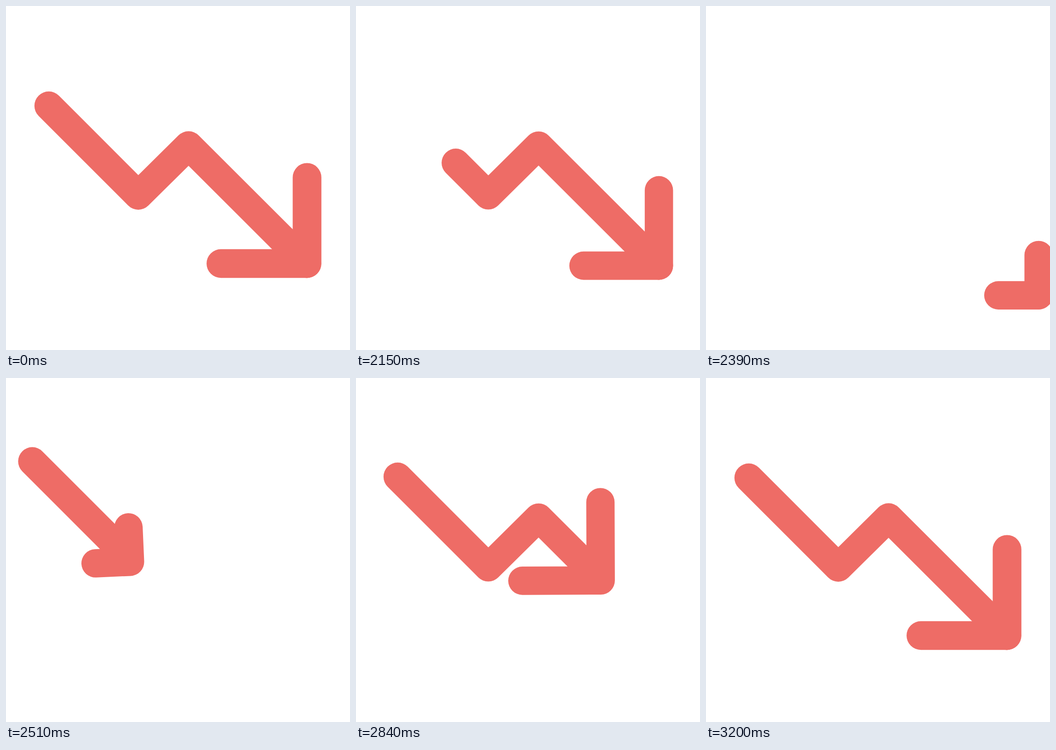
An HTML page for the animation above (3230 ms loop, 748 by 748 pixels).

```html
<!DOCTYPE html>
<html lang="en">
<head>
<meta charset="utf-8">
<title>Trending down</title>
<style>
html, body { margin: 0; width: 100%; height: 100%; overflow: hidden; background: #fff; }
svg { display: block; width: 100%; height: 100%; }
path { fill: none; stroke: #ee6c66; stroke-linecap: round; stroke-linejoin: round; }
</style>
</head>
<body>
<svg viewBox="0 0 748 748">
  <path id="line"/>
  <path id="head"/>
</svg>
<script>
const LOOP = 3230, LEAVE = 2030, ENTER = 2420, REST = 3200, STEP = 30;
const points = [[93, 217], [287.7, 411.7], [397, 303.5], [654.2, 560.2]];
const line = document.getElementById('line');
const head = document.getElementById('head');

// Distance of each corner from the start of the line
const marks = [0];
for (let i = 1; i < points.length; i++) {
  const [a, b] = [points[i - 1], points[i]];
  marks.push(marks[i - 1] + Math.hypot(b[0] - a[0], b[1] - a[1]));
}
const total = marks[3];

const clamp = u => Math.min(1, Math.max(0, u));
const smooth = (t, from, to) => {
  const u = clamp((t - from) / (to - from));
  return u * u * (3 - 2 * u);
};

// Point at distance s; the end segments continue past both ends
function pointAt(s) {
  const i = s < marks[1] ? 0 : s < marks[2] ? 1 : 2;
  const u = (s - marks[i]) / (marks[i + 1] - marks[i]);
  return points[i].map((v, k) => v + (points[i + 1][k] - v) * u);
}

function drawLine(from, to) {
  const inner = points.filter((p, i) => i > 0 && i < 3 && marks[i] > from && marks[i] < to);
  line.setAttribute('d', 'M' + [pointAt(from), ...inner, pointAt(to)].join('L'));
}

function drawHead([x, y], arm, angle) {
  head.setAttribute('d', `M0,${-arm}V0H${-arm}`);
  head.setAttribute('transform', `translate(${x} ${y}) rotate(${angle})`);
}

function setWidth(w) {
  line.setAttribute('stroke-width', w);
  head.setAttribute('stroke-width', w);
}

function rest() {
  setWidth(62.4);
  drawLine(0, total);
  drawHead([654.6, 560], 187.3, 0);
}

function leave(t) {
  const u = (t - 2000) / 270;
  const tip = total + 24 * Math.SQRT2 * u ** 2.87;
  const tail = Math.min(tip, 476 * u ** 1.7);
  drawLine(tail, tip);
  drawHead(pointAt(tip), 187 - 112 * smooth(t, 2010, 2490), 0);
}

function enter(t) {
  const tail = -Math.SQRT2 * Math.min(55, 13 * (Math.max(0, 3180 - t) / 520) ** 4);
  const left = 355 * (Math.max(0, 3125 - t) / 465) ** 1.49;
  const tip = total - left;
  const shift = 3 * left / 540;
  const [x, y] = pointAt(tip);
  const arm = t < 2500
    ? 187 - 112 * smooth(t, 2010, 2490)
    : 75 + 112 * smooth(t, 2573, 2926);
  const back = (1 - clamp((t - 2645) / 225)) ** 3;
  drawLine(tail, tip - 11);
  drawHead([x - shift, y + shift], arm, -90 * smooth(t, 2500, 2600) * back);
}

function draw(now) {
  let t = now % LOOP;
  if (t < LEAVE || t >= REST) return rest();
  t = LEAVE + Math.floor((t - LEAVE) / STEP) * STEP;
  setWidth(61.6);
  if (t < ENTER) leave(t);
  else enter(t);
}

const start = performance.now();
function tick() {
  draw(performance.now() - start);
  requestAnimationFrame(tick);
}
tick();
</script>
</body>
</html>
```
